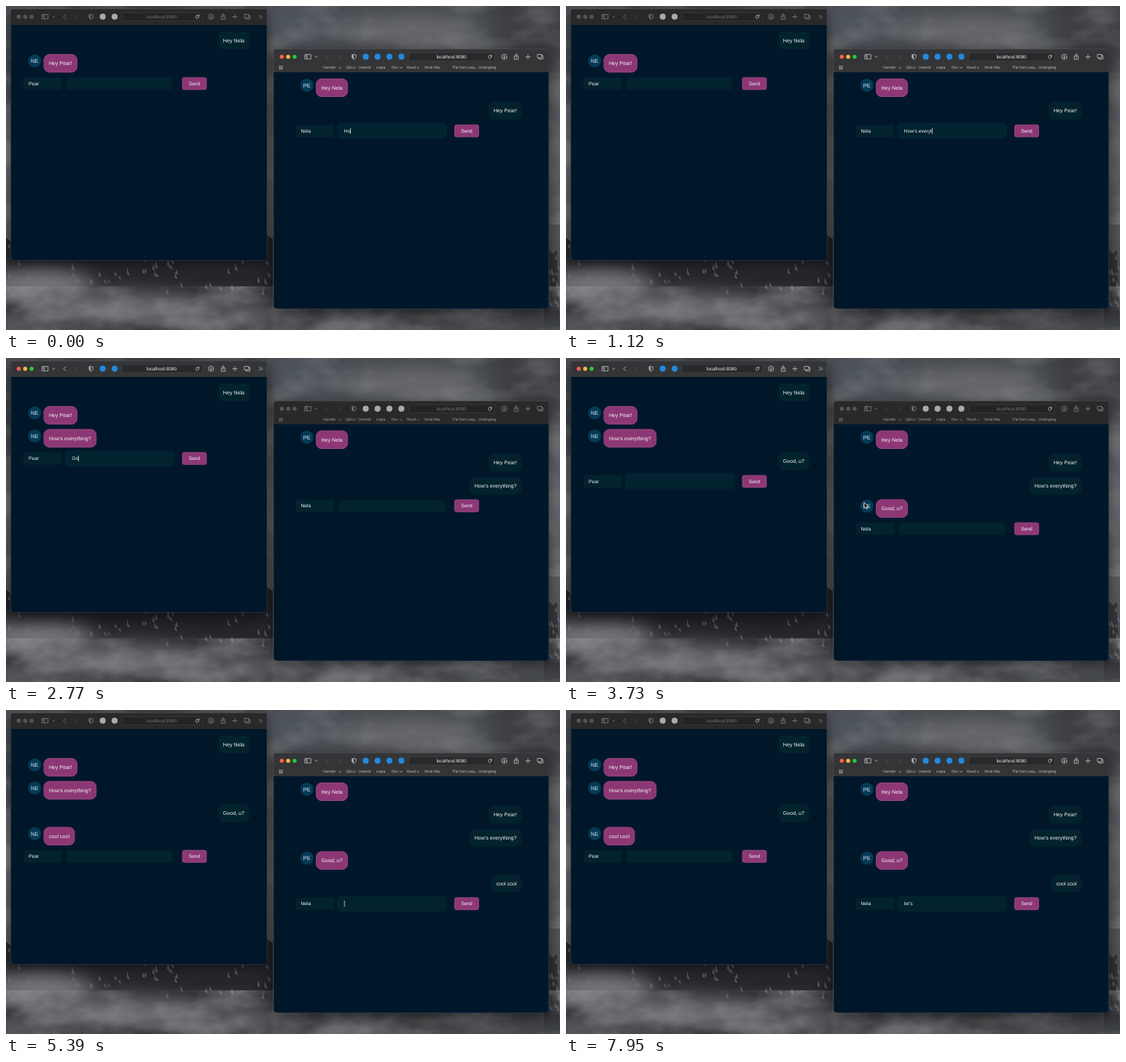
Recreate the animation shown at these times as an HTML page. Size 760 by 445 pixels, loop 8000 ms.

```html
<!DOCTYPE html>
<html lang="en">
<head>
<meta charset="utf-8">
<title>Two window chat</title>
<style>
html, body { margin: 0; width: 100%; height: 100%; overflow: hidden; background: #3d3f43; }
svg { position: absolute; left: 0; top: 0; display: block; }
text { font-family: "Liberation Sans", Arial, sans-serif; white-space: pre; text-rendering: geometricPrecision; }
.window { --bar: #29292a; --ink: #858586; --dim: #4c4c4e; --title: #777778; --field: #232324; --mark: #a9a9aa; --label: #a9a9aa; }
.window.active { --bar: #343537; --ink: #c6c6c8; --dim: #59595c; --title: #f0f0f0; --field: #28292b; --mark: #2389dc; --label: #c3c3c5; }
.frame { fill: #00172a; filter: drop-shadow(0 4px 7px rgba(0,0,0,.5)); }
.active .frame { filter: drop-shadow(0 6px 11px rgba(0,0,0,.65)); }
.bar { fill: var(--bar); }
.edge { fill: none; stroke: #77797c; stroke-opacity: .45; stroke-width: .6; }
.light { fill: #565658; }
.active .light { fill: var(--on); }
.icon { fill: none; stroke: var(--ink); stroke-width: .8; stroke-linecap: round; stroke-linejoin: round; }
.icon.faint { stroke: var(--dim); }
.icon.bright { stroke: #c9c9ca; }
.mark { fill: var(--mark); }
.field { fill: var(--field); stroke: #48494b; stroke-width: .5; }
.title { fill: var(--title); font-size: 6.4px; text-anchor: middle; }
.label { fill: var(--label); font-size: 5px; }
.message { fill: #f4f6f8; font-size: 7.1px; }
.entry { fill: #f4f6f8; font-size: 6.7px; }
.mine { fill: #02222e; }
.theirs, .send { fill: #8d3875; stroke: #a3498c; stroke-width: .8; }
.avatar { fill: #043a57; }
.initials { fill: #dce7ee; font-size: 7.6px; text-anchor: middle; }
.input { fill: #02222e; }
.focus { fill: #02222e; stroke: #032735; stroke-width: 1.2; filter: drop-shadow(0 0 2px #073342); }
</style>
</head>
<body>
<svg id="scene" width="760" height="445" viewBox="0 0 760 445">
  <defs>
    <linearGradient id="sky" x2="0" y2="1">
      <stop offset="0" stop-color="#43464b"/>
      <stop offset=".45" stop-color="#626469"/>
      <stop offset=".72" stop-color="#55575b"/>
      <stop offset="1" stop-color="#47484d"/>
    </linearGradient>
    <filter id="soft" x="-60%" y="-60%" width="220%" height="220%"><feGaussianBlur stdDeviation="13"/></filter>
    <filter id="mist" x="0" y="0" width="100%" height="100%">
      <feTurbulence type="fractalNoise" baseFrequency=".012 .022" numOctaves="4" seed="8"/>
      <feColorMatrix values="0 0 0 0 .62  0 0 0 0 .62  0 0 0 0 .64  1.6 0 0 0 -.62"/>
    </filter>
  </defs>
  <rect width="760" height="445" fill="url(#sky)"/>
  <g id="backdrop"></g>
  <g id="windows"></g>
  <path id="pointer" d="M0 0V8.2L2 6.5 3.3 9.4 4.7 8.8 3.4 6H6Z" fill="#111" stroke="#fff" stroke-width=".8"/>
</svg>
<script>
const LOOP = 8000, BLINK = 500, ROW = 31.5;
const byId = id => document.getElementById(id);

function add(parent, tag, attrs = {}, content) {
  const node = document.createElementNS("http://www.w3.org/2000/svg", tag);
  for (const key in attrs) node.setAttribute(key, attrs[key]);
  if (content !== undefined) node.textContent = content;
  parent.append(node);
  return node;
}
const box = (parent, cls, x, y, width, height, rx = 0) =>
  add(parent, "rect", { class: cls, x, y, width, height, rx });
const label = (parent, cls, x, y, content) => add(parent, "text", { class: cls, x, y }, content);

// Backdrop: soft clouds around two jagged ridges.
let seed = 17;
const random = () => (seed = seed * 16807 % 2147483647) / 2147483647;

function cloud(cx, cy, rx, ry, fill, opacity = 1) {
  add(byId("backdrop"), "ellipse", { cx, cy, rx, ry, fill, opacity, filter: "url(#soft)" });
}
function ridge(x0, x1, top, height, fill) {
  let d = `M${x0} 445`;
  for (let x = x0; x <= x1; x += 6) d += `L${x} ${top + Math.sin(x / 31) * 9 + random() * height}`;
  add(byId("backdrop"), "path", { d: d + `L${x1} 445Z`, fill });
}
function snow(x0, x1, top, height, count) {
  let d = "";
  for (let i = 0; i < count; i++) {
    const x = x0 + random() * (x1 - x0), y = top + random() * height;
    d += `M${x} ${y}l${2 + random() * 3} ${5 + random() * 7}l-4 -2Z`;
  }
  add(byId("backdrop"), "path", { d, fill: "#85868a", opacity: .5 });
}
function buildBackdrop() {
  cloud(560, 34, 90, 22, "#6e6f72", .8);
  cloud(400, 20, 60, 35, "#4d535a");
  cloud(730, 20, 60, 60, "#3d3e43");
  cloud(0, 60, 30, 70, "#3e4247");
  ridge(0, 366, 318, 14, "#24262b");
  ridge(738, 760, 335, 16, "#33353a");
  snow(0, 365, 325, 65, 65);
  snow(740, 760, 340, 65, 18);
  cloud(45, 384, 75, 22, "#77787b");
  cloud(150, 414, 130, 22, "#69696d");
  cloud(300, 428, 110, 27, "#57575c");
  cloud(570, 448, 220, 30, "#45464a");
  cloud(30, 445, 90, 16, "#5a5a5f");
  add(byId("backdrop"), "rect", { width: 760, height: 300, filter: "url(#mist)", opacity: .35 });
  add(byId("backdrop"), "rect", { y: 385, width: 760, height: 60, filter: "url(#mist)", opacity: .55 });
}

const icons = {
  sidebar: "M-4 -3H4V3H-4ZM-1.3 -3V3M-3 -1.5h.6M-3 0h.6",
  down: "M-1.4 -.6L0 .7 1.4 -.6",
  back: "M1.4 -2.8L-1.4 0 1.4 2.8",
  forward: "M-1.4 -2.8L1.4 0 -1.4 2.8",
  shield: "M0 -3.3L2.8 -2.3V.3Q2.6 2.3 0 3.5Q-2.6 2.3 -2.8 .3V-2.3ZM-.9 -2.6V2.7M-1.8 -2V2",
  reload: "M2.1 -.7A2.3 2.3 0 1 0 2.1 1M2.2 -2.5V-.6H.4",
  download: "M3.6 0A3.6 3.6 0 1 1 -3.6 0A3.6 3.6 0 1 1 3.6 0M0 -1.8V1.7M-1.4 .4L0 1.8 1.4 .4",
  share: "M-1.2 -1H-2.7V3.6H2.7V-1H1.2M0 1.4V-3.8M-1.5 -2.4L0 -3.9 1.5 -2.4",
  plus: "M-3 0H3M0 -3V3",
  tabs: "M-3.6 -3.2H1.8V1.6H-3.6ZM-1.8 1.6V3.2H3.6V-1.6H1.8",
  more: "M-2.4 -2L-.4 0 -2.4 2M.4 -2L2.4 0 .4 2",
  grid: "M-2.4 -1.8h1M-.5 -1.8h1M1.4 -1.8h1M-2.4 0h1M-.5 0h1M1.4 0h1M-2.4 1.8h1M-.5 1.8h1M1.4 1.8h1"
};
const icon = (parent, kind, x, y, tone = "") =>
  add(parent, "path", { class: "icon " + tone, d: icons[kind], transform: `translate(${x} ${y})` });

function buildWindow(spec) {
  const { x, y, w, h, bar } = spec, mid = y + 10.7;
  const g = add(byId("windows"), "g", { class: "window" });
  box(g, "frame", x, y, w, h, 4.5);
  add(g, "path", { class: "bar", d: `M${x} ${y + bar}V${y + 4.5}q0 -4.5 4.5 -4.5H${x + w - 4.5}q4.5 0 4.5 4.5V${y + bar}Z` });
  ["#ff5f57", "#febc2e", "#28c840"].forEach((color, i) =>
    add(g, "circle", { class: "light", cx: spec.lights + i * 8.8, cy: mid, r: 2.8, style: `--on:${color}` }));
  for (const [kind, ix, tone] of spec.icons) icon(g, kind, ix, mid, tone);
  for (const cx of spec.marks) add(g, "circle", { class: "mark", cx, cy: mid, r: 4.1 });
  const [fx, fw] = spec.field;
  box(g, "field", fx, mid - 5.4, fw, 11, 2.6);
  label(g, "title", fx + fw / 2 - .5, mid + 2.2, "localhost:8080");
  icon(g, "reload", fx + fw - 6.5, mid, "bright");
  if (spec.bookmarks) {
    icon(g, "grid", 377, 84.7);
    for (const [bx, name, arrow] of spec.bookmarks) {
      label(g, "label", bx, 86.4, name);
      if (arrow) icon(g, "down", arrow, 84.8);
    }
  }
  box(g, "edge", x, y, w, h, 4.5);
  return g;
}

const windows = {
  left: buildWindow({
    x: 6.5, y: 4, w: 351.5, h: 345.5, bar: 22, lights: 17.5, field: [159, 110], marks: [132.7, 149],
    icons: [["sidebar", 53.7], ["down", 65.3], ["back", 80.5], ["forward", 96, "faint"], ["shield", 116.7],
      ["download", 281.3], ["share", 298], ["plus", 314], ["tabs", 331], ["more", 349.7]]
  }),
  right: buildWindow({
    x: 367, y: 59, w: 377.7, h: 357, bar: 32, lights: 378.3, field: [552.5, 118], marks: [493.5, 509.7, 526, 542.4],
    icons: [["sidebar", 414.3], ["down", 425.8], ["back", 441, "faint"], ["forward", 456.7, "faint"], ["shield", 477.4],
      ["download", 683.5], ["share", 700], ["plus", 716], ["tabs", 733]],
    bookmarks: [[435, "Varnelo", 458], [466, "QELU"], [483, "Overnib"], [508, "Lopta"], [529, "Dev", 542],
      [550, "Read", 565], [574, "Stroll Afar"], [612, "The Dim Loop…Untangling"]]
  })
};

const users = { left: "Pear", right: "Nela" };
const origins = { left: [0, 35], right: [373.5, 100] };
const messages = [
  { from: "left", text: "Hey Nela", sent: -1 },
  { from: "right", text: "Hey Pear!", sent: -1 },
  { from: "right", text: "How's everything?", start: -150, step: 108, sent: 1780 },
  { from: "left", text: "Good, u?", start: 2660, step: 66, sent: 3210 },
  { from: "right", text: "cool cool", start: 4250, step: 95, sent: 5180 },
  { from: "right", text: "let's", start: 6000, step: 100, sent: Infinity }
];
const focusChanges = [[-LOOP, "right"], [2300, "left"], [3950, "right"]];
const pointerTrips = [
  [[1900, 480, 174], [2230, 150, 138], [2600, 150, 138]],
  [[3450, 150, 137], [3730, 408.5, 198], [3900, 480, 235], [4200, 480, 235]]
];

function buildChat(side) {
  const g = add(windows[side], "g", { transform: `translate(${origins[side]})` });
  const rows = messages.filter(m => m.sent < LOOP).map((m, i) => {
    const row = add(g, "g", { transform: `translate(0 ${i * ROW})` });
    const mine = m.from === side;
    const bubble = box(row, mine ? "mine" : "theirs", 52, 0, 0, 24.5, 7.5);
    const words = label(row, "message", 59, 14.6, m.text);
    const width = words.getComputedTextLength() + 14;
    bubble.setAttribute("width", width);
    if (mine) {
      bubble.setAttribute("x", 334 - width);
      words.setAttribute("x", 341 - width);
    } else {
      add(row, "circle", { class: "avatar", cx: 39.3, cy: 8.9, r: 9 });
      label(row, "initials", 39.3, 11.7, users[m.from].slice(0, 2).toUpperCase());
    }
    return row;
  });
  const form = add(g, "g");
  box(form, "input", 24, 0, 52.7, 17, 2.5);
  label(form, "entry", 31, 10.9, users[side]);
  const input = box(form, "input", 83.5, 0, 145, 17, 2.5);
  const draft = label(form, "entry", 90.3, 10.9, "");
  const caret = add(form, "rect", { y: 4.4, width: .7, height: 8.2, fill: "#f4f6f8" });
  box(form, "send", 242, .2, 33, 16.6, 2.6);
  const send = label(form, "entry", 258.5, 10.9, "Send");
  send.setAttribute("text-anchor", "middle");
  return { rows, form, input, draft, caret };
}

const show = (node, visible) => node.setAttribute("visibility", visible ? "visible" : "hidden");

function renderChat(side, t, active, focusedAt) {
  const { rows, form, input, draft, caret } = chats[side];
  const count = messages.filter(m => m.sent <= t).length;
  rows.forEach((row, i) => show(row, i < count));
  form.setAttribute("transform", `translate(0 ${count * ROW})`);
  input.setAttribute("class", active ? "focus" : "input");

  let text = "", lastAction = focusedAt;
  for (const m of messages) {
    if (m.from !== side || !(m.start <= t)) continue;
    if (m.sent <= t) { lastAction = Math.max(lastAction, m.sent); continue; }
    const typed = Math.min(m.text.length, Math.floor((t - m.start) / m.step) + 1);
    text = m.text.slice(0, typed);
    lastAction = m.start + (typed - 1) * m.step;
  }
  if (draft.textContent !== text) draft.textContent = text;
  caret.setAttribute("x", 90.3 + (text ? draft.getComputedTextLength() : 0));
  show(caret, active && Math.floor((t - lastAction) / BLINK) % 2 === 0);
}

function renderPointer(t) {
  const trip = pointerTrips.find(p => t >= p[0][0] && t < p.at(-1)[0]);
  show(byId("pointer"), trip);
  if (!trip) return;
  const i = trip.findIndex(p => p[0] > t);
  const [t0, x0, y0] = trip[i - 1], [t1, x1, y1] = trip[i];
  const k = (t - t0) / (t1 - t0);
  byId("pointer").setAttribute("transform", `translate(${x0 + (x1 - x0) * k} ${y0 + (y1 - y0) * k})`);
}

function render(t) {
  const [focusedAt, focused] = focusChanges.findLast(([time]) => time <= t);
  for (const side in windows) {
    windows[side].classList.toggle("active", side === focused);
    renderChat(side, t, side === focused, focusedAt);
  }
  renderPointer(t);
}

buildBackdrop();
const chats = { left: buildChat("left"), right: buildChat("right") };
const began = performance.now();
function tick() {
  render((performance.now() - began) % LOOP);
  requestAnimationFrame(tick);
}
tick();
</script>
</body>
</html>
```
